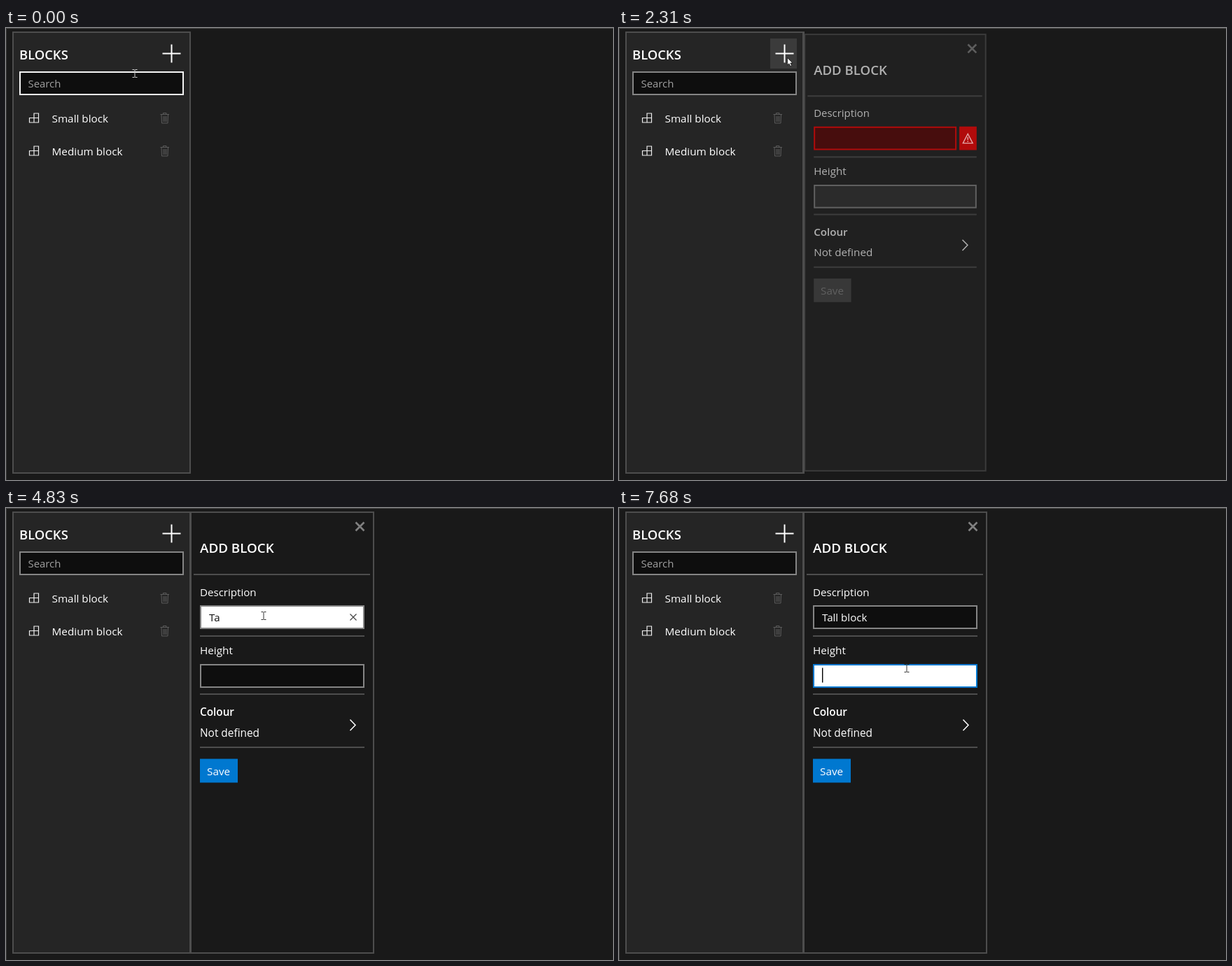
Animation, 867 px wide and 646 px high, one loop 8 s. Source, as an HTML page with a canvas:

```html
<!DOCTYPE html>
<html lang="en">
<head>
<meta charset="utf-8">
<title>Add block</title>
<style>
  html, body { margin: 0; width: 100%; height: 100%; overflow: hidden; background: #191919; }
  canvas { display: block; }
</style>
</head>
<body>
<canvas id="stage" width="867" height="646"></canvas>
<script>
const ctx = document.getElementById('stage').getContext('2d');
const LOOP = 8000;
const FONT = '"Open Sans", "Noto Sans", sans-serif';
const GRAY = '#858585', RULE = '#4d4d4d', WHITE = '#fff', BLUE = '#0078d0', DARK = '#0e0e0e', RED = '#f00';

// Pointer: [time, kind, x, y]; arrows are placed by tip, beams by centre.
const POINTER = [
  [0, 'beam', 184, 65], [120, 'beam', 190, 65], [250, 'arrow', 208, 60],
  [390, 'beam', 226, 65], [510, 'arrow', 243, 60], [630, 'arrow', 250, 54],
  [780, 'arrow', 246, 45], [930, 'arrow', 244, 43], [1240, 'arrow', 242, 42],
  [1370, 'arrow', 240, 42], [2430, 'arrow', 247, 47], [2550, 'arrow', 283, 70],
  [2670, 'arrow', 319, 80], [2820, 'beam', 365.5, 149], [3070, 'beam', 365.5, 148],
  [3220, 'beam', 368, 154], [6980, 'beam', 380, 142], [7130, 'beam', 413, 232],
  [7280, 'beam', 413, 229], [7530, 'beam', 417, 238], [7680, 'beam', 411, 229]
];
// Panel opening: [time, opacity, scale]
const OPENING = [[0, 0, 1], [2190, 0.25, 0.977], [2310, 0.65, 0.99], [2430, 0.9, 0.997], [2550, 1, 1]];
const TYPING = [
  [0, ''], [4430, 'T'], [4830, 'Ta'], [4950, 'Tal'], [5220, 'Tall'], [5490, 'Tall b'],
  [5610, 'Tall bl'], [5730, 'Tall blo'], [5880, 'Tall bloc'], [6000, 'Tall block']
];
const CARET = [[3500, 4030], [4680, 4830], [4950, 5070], [5610, 5730], [5880, 6000],
  [6550, 6700], [6980, 7130], [7530, 8000]];

const at = (steps, t) => steps.findLast(step => step[0] <= t);
const within = (t, from, to) => t >= from && t < to;

function box(x, y, w, h, fill) {
  ctx.fillStyle = fill;
  ctx.fillRect(x, y, w, h);
}

function frame(x, y, w, h, border, fill) {
  box(x, y, w, h, border);
  box(x + 2, y + 2, w - 4, h - 4, fill);
}

function text(str, x, y, color = WHITE, size = 15.3, weight = 400) {
  ctx.font = `${weight} ${size}px ${FONT}`;
  ctx.fillStyle = color;
  ctx.fillText(str, x, y);
}

function stroke(path, color, width = 1) {
  ctx.strokeStyle = color;
  ctx.lineWidth = width;
  ctx.stroke(new Path2D(path));
}

function caret(x, y) {
  box(x, y, 1.4, 21, '#000');
}

function listItem(label, y) {
  stroke(`M33.5 ${y - 0.5}h13v6.5h-13zM40 ${y + 6}v-13h6.5v6.5`, '#eee', 1.2);
  text(label, 65.5, y + 6);
  stroke(`M220.5 ${y - 5.5}h12.5M224.5 ${y - 5.5}v-2h4.5v2M222 ${y - 5}l.5 12h8.5l.5 -12
          M225 ${y - 3}v8M227 ${y - 3}v8M229 ${y - 3}v8`, '#5b5b5b');
}

function drawList(t) {
  frame(9, 5, 255, 632, RULE, '#252525');
  if (within(t, 1760, 2430)) box(264, 5, 1, 632, RULE);
  text('BLOCKS', 19, 44.5, WHITE, 18.4, 600);
  if (within(t, 630, 2430)) box(216, 15, 38, 43, '#3b3b3b');
  stroke('M223.5 36.5h26M236.5 23.5v26', WHITE, 2);
  const lit = t < 250 || within(t, 390, 2310);
  frame(19, 62, 235, 34, lit ? '#f5f5f5' : GRAY, DARK);
  text('Search', 31.5, 84.5, '#a0a0a0', 14.9);
  listItem('Small block', 129);
  listItem('Medium block', 176);
}

function drawTooltip(t) {
  if (!within(t, 1520, 1760)) return;
  ctx.globalAlpha = t < 1640 ? 1 : 0.4;
  box(200, 0, 77, 19, '#1d1d1d');
  stroke('M200.5 0v18.5h76v-18.5', '#292929');
  text('Add Block', 210, 8, '#424242', 12.3);
  ctx.globalAlpha = 1;
}

function drawDescription(t) {
  const cleared = t >= 4560, focused = within(t, 3500, 7530);
  const border = cleared ? GRAY : focused ? BLUE : t >= 2820 ? '#f5f5f5' : RED;
  frame(277, 139, cleared ? 235 : 206, 34, border, focused ? WHITE : DARK);
  if (!cleared) {
    box(487, 139, 25, 34, RED);
    stroke('M499.3 149.5l7 13.5h-14zM499.3 154v4.5M499.3 159.7v1.6', WHITE, 1.4);
  } else if (focused) {
    stroke('M491.5 151.5l9 9M500.5 151.5l-9 9', '#444', 1.2);
  }
  const typed = at(TYPING, t)[1];
  text(typed, 290, 161.5, focused ? '#111' : WHITE, 15.1);
  const blinkOn = CARET.some(([from, to]) => within(t, from, to));
  if (focused && blinkOn) caret(290 + ctx.measureText(typed).width, 145);
}

function drawHeight(t) {
  const focused = t >= 7530;
  frame(277, 223, 235, 34, focused ? BLUE : t >= 7130 ? '#f5f5f5' : GRAY, focused ? WHITE : DARK);
  if (focused) caret(290, 228.5);
}

function drawForm(t) {
  const [, opacity, scale] = at(OPENING, t);
  if (!opacity) return;
  ctx.save();
  ctx.globalAlpha = opacity;
  ctx.translate(394.5, 320);
  ctx.scale(scale, scale);
  ctx.translate(-394.5, -320);
  frame(263, 5, 263, 632, RULE, opacity < 1 ? '#111' : '#191919');
  stroke('M499.5 20.5l12 12M511.5 20.5l-12 12', '#808080', 2.6);
  text('ADD BLOCK', 277, 64, WHITE, 18.8, 600);
  box(268, 94, 252, 2, RULE);
  text('Description', 277, 125.5, WHITE, 15.1);
  drawDescription(t);
  text('Height', 277, 209);
  drawHeight(t);
  text('Colour', 277, 296.5, WHITE, 15.3, 600);
  text('Not defined', 277, 326.5, WHITE, 15.4);
  stroke('M491.5 302.5l7.5 7.7l-7.5 7.7', WHITE, 1.5);
  for (const y of [182, 265, 341]) box(277, y, 235, 2, RULE);
  const enabled = t >= 4560;
  box(277, 358.5, 54, 34, enabled ? BLUE : '#464646');
  text('Save', 287, 381.5, enabled ? WHITE : '#777');
  ctx.restore();
}

function drawPointer(t) {
  const [, kind, x, y] = at(POINTER, t);
  ctx.save();
  ctx.translate(x, y);
  if (kind === 'arrow') {
    const arrow = new Path2D('M.5 .5v10.5l2.4-2.2l1.8 3.8l1.9-.9l-1.8-3.6h3.2z');
    ctx.fillStyle = WHITE;
    ctx.fill(arrow);
    ctx.strokeStyle = '#000';
    ctx.lineWidth = 0.7;
    ctx.stroke(arrow);
  } else {
    const onWhite = within(t, 3500, 7130) || t >= 7530;
    stroke('M-3.5 -5.5h3M.5 -5.5h3M0 -5v10.5M-3.5 5.5h3M.5 5.5h3', onWhite ? '#333' : '#ccc');
  }
  ctx.restore();
}

function draw(now) {
  const t = now % LOOP;
  box(0, 0, 867, 646, '#191919');
  box(0, 0, 867, 1, '#4a4a4a');
  box(0, 0, 1, 646, '#383838');
  drawList(t);
  drawTooltip(t);
  drawForm(t);
  drawPointer(t);
  requestAnimationFrame(draw);
}
requestAnimationFrame(draw);
</script>
</body>
</html>
```
